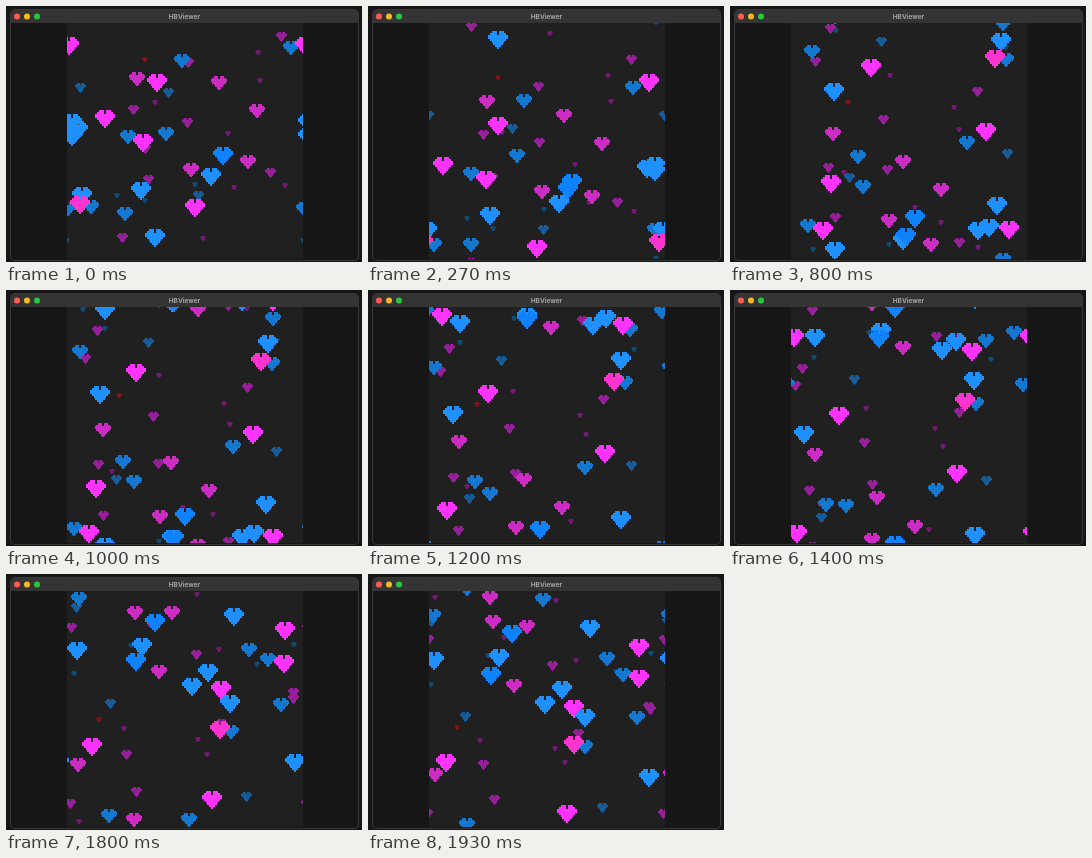
An HTML page with a canvas that plays this animation: 356x256 px, repeating every 2000 ms.

```html
<!DOCTYPE html>
<html lang="en">
<head>
<meta charset="utf-8">
<title>Falling hearts</title>
<style>
  html, body { margin: 0; width: 100%; height: 100%; overflow: hidden; background: #161616; }
  canvas { display: block; }
</style>
</head>
<body>
<canvas id="stage" width="356" height="256"></canvas>
<script>
const ctx = document.getElementById('stage').getContext('2d');
const LEFT = 61, TOP = 17, FIELD = 236;
const LOOP = 2000, STEP = LOOP / 30;

let seed = 7;
function random() {
  seed = (seed * 16807) % 2147483647;
  return seed / 2147483647;
}

// Distant hearts are scattered; the fall is the distance covered per loop.
const scatter = (count, slow, fast) => Array.from({ length: count }, () =>
  [LEFT + random() * FIELD, TOP + random() * FIELD, slow + random() * (fast - slow)]);

// Layers from back to front; near hearts are placed as [x, y, fall].
const layers = [
  { size: 6, color: '#124b72', hearts: scatter(4, 66, 180) },
  { size: 6, color: '#701a72', hearts: scatter(7, 75, 180) },
  { size: 6, color: '#7a1418', hearts: scatter(1, 66, 180) },
  { size: 11, color: '#175c98', hearts: scatter(3, 86, 204) },
  { size: 11, color: '#961f9a', hearts: scatter(8, 86, 204) },
  { size: 16, color: '#1478d0', hearts: [[298, 202, 118], [85, 200, 208], [122, 130, 206], [160, 127, 123],
    [176, 54, 223], [285, 41, 220], [119, 207, 172]] },
  { size: 16, color: '#cc2cc4', hearts: [[131, 72, 128], [213, 76, 183], [251, 104, 184], [185, 163, 120],
    [242, 155, 192]] },
  { size: 20, color: '#ff33ff', hearts: [[299, 39, 200], [151, 76, 233], [99, 112, 258], [137, 136, 204],
    [189, 201, 223]] },
  { size: 20, color: '#1e90ff', hearts: [[302, 130, 160], [66, 116, 250], [72, 123, 228], [76, 189, 190],
    [205, 170, 149], [135, 184, 138], [149, 231, 208]] },
  { size: 20, color: '#0f82ff', hearts: [[217, 149, 146], [217, 149, 188]] },
  { size: 20, color: '#ff33d0', hearts: [[74, 198, 208]] }
];

// The fall is slightly uneven: [step, share of the distance covered].
const pace = [[0, 0], [4, .183], [8, .316], [12, .432], [18, .618], [24, .819], [29, 1]];

function progress(step) {
  const i = pace.findIndex(([s]) => s >= step);
  if (i < 1) return 0;
  const [s0, p0] = pace[i - 1], [s1, p1] = pace[i];
  return p0 + (p1 - p0) * (step - s0) / (s1 - s0);
}

const wrap = (v, start) => start + ((v - start) % FIELD + FIELD) % FIELD;

// A stepped heart of 11 by 9 cells: rounded top, notch in two rows, diagonal sides.
function drawHeart(cx, cy, size) {
  const left = Math.round(cx - size / 2), top = Math.round(cy - size * .4);
  const col = c => left + Math.round(c * size / 11);
  const row = r => top + Math.round(r * size * .88 / 9);
  const bar = (a, b, r) => ctx.fillRect(col(a), row(r), col(b) - col(a), row(r + 1) - row(r));
  for (let r = 0; r < 9; r++) {
    const inset = Math.max(2 - r, r - 3, 0);
    if (r < 2) {
      bar(inset, 5, r);
      bar(6, 11 - inset, r);
    } else bar(inset, 11 - inset, r);
  }
}

// Repeats a heart across the edges of the field.
function drawWrapped(x, y, size) {
  for (const dx of [-FIELD, 0, FIELD])
    for (const dy of [-FIELD, 0, FIELD])
      drawHeart(x + dx, y + dy, size);
}

function box(color, x, y, w, h, radii) {
  ctx.fillStyle = color;
  ctx.beginPath();
  ctx.roundRect(x, y, w, h, radii);
  ctx.fill();
}

function drawWindow() {
  box('#161616', 0, 0, 356, 256, 0);
  box('#383838', 4, 3, 349, 252, 5);
  box('#161616', 5, 4, 347, 250, 4);
  box('#343434', 5, 4, 347, 13, [4, 4, 0, 0]);
  ['#ff5b52', '#f6b91f', '#25c93c'].forEach((color, i) => box(color, 8 + i * 10, 7.5, 6, 6, 3));
  ctx.fillStyle = '#a4a4a4';
  ctx.font = 'bold 6.5px Inter, sans-serif';
  ctx.textAlign = 'center';
  ctx.textBaseline = 'middle';
  ctx.fillText('HBViewer', 178.5, 10.8);
  box('#202020', LEFT, TOP, FIELD, FIELD, 0);
}

function draw(step) {
  const p = progress(step);
  drawWindow();
  ctx.save();
  ctx.beginPath();
  ctx.rect(LEFT, TOP, FIELD, FIELD);
  ctx.clip();
  for (const { size, color, hearts } of layers) {
    ctx.fillStyle = color;
    for (const [x, y, fall] of hearts)
      drawWrapped(wrap(x - fall * p / 2, LEFT), wrap(y + fall * p, TOP), size);
  }
  ctx.restore();
}

const start = performance.now();
function tick() {
  const t = (performance.now() - start) % LOOP;
  draw(Math.floor((t + 3.4) / STEP) % 30);
  requestAnimationFrame(tick);
}
tick();
</script>
</body>
</html>
```
